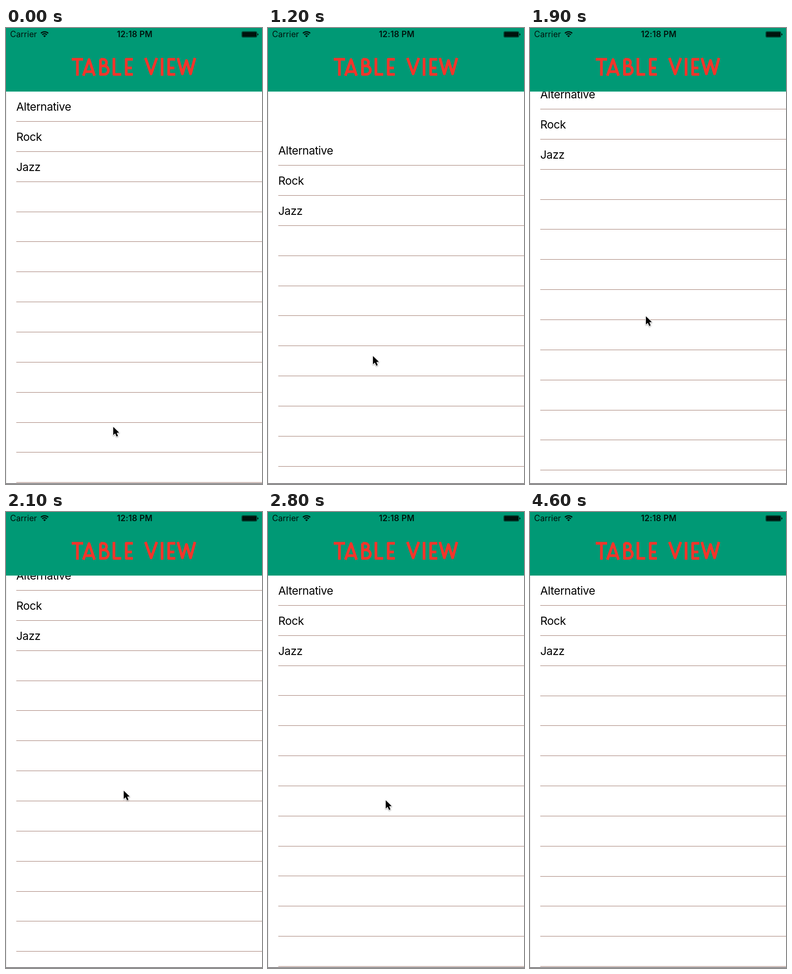
An HTML page for the animation above (5 s loop, 561 px wide and 998 px high).

```html
<!DOCTYPE html>
<html lang="en">
<head>
<meta charset="utf-8">
<title>Table view</title>
<style>
html, body { margin: 0; width: 100%; height: 100%; overflow: hidden; background: #fff; }
svg { position: absolute; left: 0; top: 0; display: block; }
text { font-family: Inter, "Liberation Sans", sans-serif; }
h1 { position: absolute; left: 144px; top: 64px; margin: 0; color: transparent; font: 34px/40px Lato, sans-serif; }
</style>
</head>
<body>
<h1>TABLE VIEW</h1>
<svg width="561" height="998" viewBox="0 0 561 998">
  <defs><path id="e" d="M14.5 68.5H0V101.5H14.5M0 87.5H12.5"/></defs>
  <rect width="561" height="998" fill="#fff"/>
  <g id="lines" fill="#a07a6e"></g>
  <g id="labels" font-size="24.6" letter-spacing="-0.45"></g>
  <rect y="139" width="1" height="859" fill="#e6e6e6"/>
  <rect y="996" width="561" height="1" fill="#a3a0a2"/>
  <rect y="997" width="561" height="1" fill="#6b686b"/>

  <rect width="561" height="139.15" fill="#009975"/>
  <g fill="#00130d">
    <text x="9" y="20.3" font-size="18">Carrier</text>
    <text x="282" y="20.3" font-size="18" font-weight="600" letter-spacing="0.2" text-anchor="middle">12:18 PM</text>
    <path d="M76.5 11.6A11.2 11.2 0 0 1 92.5 11.6M79.4 14.8A7 7 0 0 1 89.6 14.8" fill="none" stroke="#00130d" stroke-width="2.5"/>
    <path d="M84.5 20.2L81.5 17.2A4.2 4.2 0 0 1 87.5 17.2Z"/>
    <rect x="516.5" y="7.5" width="33.5" height="13" rx="2.5" fill="none" stroke="#00130d" stroke-opacity=".6"/>
    <rect x="517.5" y="8.5" width="31.5" height="11" rx="1.5"/>
    <path d="M551 11.5q2.2 .5 2.2 2.5t-2.2 2.5Z"/>
  </g>

  <g fill="none" stroke="#f2352b" stroke-width="6" stroke-linejoin="round">
    <path d="M144 68.5H169M156.5 68V104.5"/>
    <path d="M169.5 104.5L182 69L194 104.5M174 95.5H190"/>
    <path d="M207 68.5V101.5H215A9.2 9.2 0 0 0 215 83H207M207 68.5H213A7.2 7.2 0 0 1 213 83"/>
    <path d="M236.5 65.5V101.5H252.5"/>
    <use href="#e" x="263.5"/>
    <path d="M305.5 65.5L318 100.5L330.5 65.5"/>
    <path d="M342 65.5V104.5"/>
    <use href="#e" x="356.5"/>
    <path d="M376.5 65.5L386.5 100.5L395.5 71L404.5 100.5L414 65.5"/>
  </g>

  <path id="cursor" d="M0 0V18L4.1 14.2L7.4 21.2L10.4 19.8L7.6 12.9L13 12.6Z" stroke="#fff" stroke-width="2.4"
    stroke-linejoin="round" paint-order="stroke" style="filter:drop-shadow(0 1.5px 1.3px rgba(0,0,0,.4))"/>
</svg>
<script>
const LOOP = 5000, STEP = 100, ROW = 65.85, FIRST_LINE = 204.5, VIEW = 859;
const [lines, labels, cursor] = ["lines", "labels", "cursor"].map(id => document.getElementById(id));

// pointer moves: start, end, x, y; it rests in between
const origin = [235, 873];
const moves = [
  [0, 500, 230, 521],
  [500, 1200, 230, 718],
  [1200, 1600, 230, 733],
  [1600, 2000, 258, 612],
  [2000, 2300, 258, 606],
  [2300, 2800, 258, 631],
  [3400, 3800, 207, 267],
  [4300, 4600, 232, 800]
];
const LEAVE = 4600;

// drags that pull the list past its edge: press, release
const drags = [[500, 1215], [1780, 2045]];

const clamp = k => Math.min(1, Math.max(0, k));
const ease = k => k * k * (3 - 2 * k);

function pointer(t) {
  return moves.reduce(([x, y], [from, to, nx, ny]) => {
    const k = ease(clamp((t - from) / (to - from)));
    return [x + (nx - x) * k, y + (ny - y) * k];
  }, origin);
}

function rubber(d) {
  const k = Math.abs(d) * 0.55 / VIEW;
  return Math.sign(d) * VIEW * k / (1 + k);
}

// stretch while held, then a critically damped return
function scroll(t) {
  const drag = drags.filter(d => t >= d[0]).pop();
  if (!drag) return 0;
  const [press, release] = drag;
  const pull = rubber(pointer(Math.min(t, release))[1] - pointer(press)[1]);
  const s = Math.max(0, t - release) / 100;
  return pull * (1 + s) * Math.exp(-s);
}

function add(parent, tag, attrs, label = "") {
  const el = document.createElementNS("http://www.w3.org/2000/svg", tag);
  for (const key in attrs) el.setAttribute(key, attrs[key]);
  el.textContent = label;
  return parent.appendChild(el);
}

["Alternative", "Rock", "Jazz"].forEach((name, i) =>
  add(labels, "text", { x: 22.5, y: Math.round(181 + i * ROW) }, name));
const rules = Array.from({ length: 14 }, () =>
  add(lines, "rect", { x: 22.5, width: 539, height: 1 }));

function draw(now) {
  const t = Math.floor(now % LOOP / STEP) * STEP;
  const shift = scroll(t);
  labels.setAttribute("transform", `translate(0 ${Math.round(shift)})`);
  rules.forEach((rule, i) => rule.setAttribute("y", Math.floor(FIRST_LINE + i * ROW + shift)));
  cursor.setAttribute("transform", `translate(${pointer(t).map(Math.round)})`);
  cursor.setAttribute("visibility", t < LEAVE ? "visible" : "hidden");
}

const begin = performance.now();
function tick() {
  draw(performance.now() - begin);
  requestAnimationFrame(tick);
}
tick();
</script>
</body>
</html>
```
